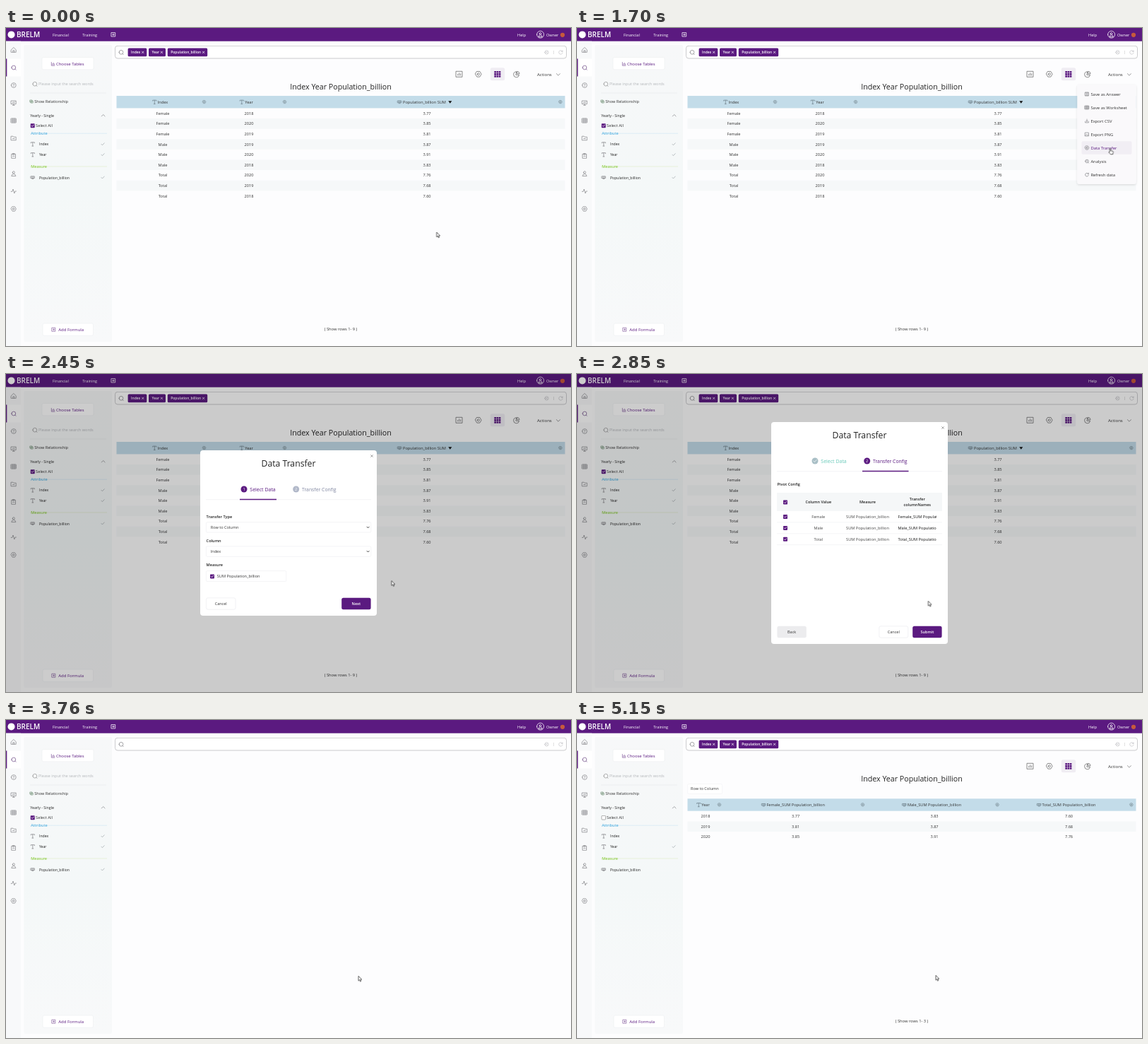
Animation, 800 px wide and 450 px high, one loop 5.3 s. Source, as an HTML page:

```html
<!DOCTYPE html>
<html lang="en">
<head>
<meta charset="utf-8">
<title>Data transfer</title>
<style>
html, body { margin: 0; width: 100%; height: 100%; overflow: hidden; background: #fdfdfe; }
svg { display: block; width: 800px; height: 450px; font: 5.65px "Open Sans", "Noto Sans", sans-serif; }
.line { fill: none; stroke: #8a8a8e; stroke-width: .75; stroke-linecap: round; stroke-linejoin: round; }
.b { font-weight: 600; }
.m { text-anchor: middle; }

/* hard switches */
.sw { animation: 5.3s step-end infinite; }
#tags { animation-name: tags; }
#tools { animation-name: tools; }
#wide, #checked { animation-name: wide; }
#pivot, #unchecked { animation-name: pivot; }
#actHover { animation-name: actHover; }
#shade { animation-name: shade; }
#pick { animation-name: pick; }
#config { animation-name: config; }
#rowHover { animation-name: rowHover; }
#chosen { animation-name: chosen; }
#arrow { animation-name: arrow; }
#hand { animation-name: hand; }
#nextHover { animation-name: nextHover; }
#submitHover { animation-name: submitHover; }
@keyframes tags { 0% { visibility: visible } 70.943% { visibility: hidden } 78.302%, 100% { visibility: visible } }
@keyframes tools { 0% { visibility: visible } 70.943% { visibility: hidden } 88.679%, 100% { visibility: visible } }
@keyframes wide { 0% { opacity: 1 } 70.943%, 100% { opacity: 0 } }
#checked { animation-name: checked; }
@keyframes checked { 0% { opacity: 1 } 88.679%, 100% { opacity: 0 } }
@keyframes pivot { 0% { opacity: 0 } 88.679%, 100% { opacity: 1 } }
@keyframes actHover { 0% { opacity: 0 } 9.434% { opacity: 1 } 23.6%, 100% { opacity: 0 } }
@keyframes shade { 0% { opacity: 0 } 33.774% { opacity: .2 } 70.943%, 100% { opacity: 0 } }
@keyframes pick { 0% { visibility: hidden } 33.774% { visibility: visible } 53.774%, 100% { visibility: hidden } }
@keyframes config { 0% { visibility: hidden } 53.774% { visibility: visible } 70.943%, 100% { visibility: hidden } }
@keyframes rowHover {
  0% { opacity: 0; transform: translateY(0) }
  24.13% { opacity: 1; transform: translateY(0) }
  25.26% { opacity: 1; transform: translateY(19px) }
  26.2% { opacity: 1; transform: translateY(38px) }
  27.17% { opacity: 1; transform: translateY(57px) }
  28.38%, 100% { opacity: 1; transform: translateY(76px) }
}
@keyframes chosen { 0% { fill: #333 } 28.38%, 100% { fill: #5b1a80 } }
@keyframes arrow {
  0% { opacity: 1 } 9.434% { opacity: 0 } 33.774% { opacity: 1 } 47.5% { opacity: 0 }
  53.774% { opacity: 1 } 61% { opacity: 0 } 70.943%, 100% { opacity: 1 }
}
@keyframes hand {
  0% { opacity: 0 } 9.434% { opacity: 1 } 33.774% { opacity: 0 } 47.5% { opacity: 1 }
  53.774% { opacity: 0 } 61% { opacity: 1 } 70.943%, 100% { opacity: 0 }
}
@keyframes nextHover { 0% { opacity: 0 } 47.5%, 100% { opacity: .1 } }
@keyframes submitHover { 0% { opacity: 0 } 63.962%, 100% { opacity: .1 } }

/* moving parts */
#menu { transform-origin: 750px 80px; animation: menu 5.3s infinite; }
@keyframes menu {
  0%, 12.075% { opacity: 0; transform: scaleY(.3); animation-timing-function: cubic-bezier(.23, 1, .32, 1) }
  17.17%, 33.77% { opacity: 1; transform: none; animation-timing-function: step-end }
  33.774%, 100% { opacity: 0; transform: none }
}
#cursor { animation: cursor 5.3s ease-in-out infinite; }
@keyframes cursor {
  0%, 1.132% { transform: translate(609.7px, 289px) }
  10.377%, 21.698% { transform: translate(771px, 66.5px) }
  30.377% { transform: translate(754.3px, 170px) }
  33.774% { transform: translate(754.3px, 170px); animation-timing-function: ease-in }
  40.566% { transform: translate(648px, 232px); animation-timing-function: ease-out }
  52.075%, 53.774% { transform: translate(497.3px, 321.3px) }
  63.396%, 78.302% { transform: translate(499px, 362.3px) }
  86.981%, 100% { transform: translate(508px, 361.3px) }
}
</style>
</head>
<body>
<svg id="stage" viewBox="0 0 800 450"></svg>
<script>
const purple = '#5b1a80', ink = '#333';

const text = (x, y, s, size = 5.65, fill = ink, cls = '') =>
  `<text x="${x}" y="${y}" font-size="${size}" fill="${fill}" class="${cls}">${s}</text>`;
const mid = (x, y, s, size, fill, cls = '') => text(x, y, s, size, fill, 'm ' + cls);
const rect = (x, y, w, h, fill, r = 0, stroke = 'none') =>
  `<rect x="${x}" y="${y}" width="${w}" height="${h}" rx="${r}" fill="${fill}" stroke="${stroke}" stroke-width=".6"/>`;
const dot = (x, y, r, fill) => `<circle cx="${x}" cy="${y}" r="${r}" fill="${fill}"/>`;
const group = (id, body, cls = 'sw') => `<g id="${id}" class="${cls}">${body}</g>`;
const icon = (x, y, d, color = '#8a8a8e', k = 1) =>
  `<path class="line" style="stroke:${color};stroke-width:${.75 / k}" transform="translate(${x} ${y}) scale(${k})" d="${d}"/>`;
const hline = (x1, x2, y, color, w = .6) =>
  `<path d="M${x1} ${y}H${x2}" stroke="${color}" stroke-width="${w}"/>`;

const ring = r => `M${-r} 0A${r} ${r} 0 1 1 ${r} 0A${r} ${r} 0 1 1 ${-r} 0Z`;
const gear = 'M-1.7 -3.2H1.7L3.6 0L1.7 3.2H-1.7L-3.6 0Z' + ring(1.3);
const lens = ring(2.9) + 'M2 2.1L3.2 3.3';
const tick = 'M-2 0L-.6 1.5L2.2 -1.5';
const cross = 'M-1.4 -1.4L1.4 1.4M1.4 -1.4L-1.4 1.4';
const down = 'M-2.6 -1.2L0 1.4L2.6 -1.2';
const tee = 'M-2.6 -1.5V-2.5H2.6V-1.5M0 -2.5V2.7M-1 2.7H1';
const num = 'M-2.6 -1.6H2.6V1H-2.6ZM-1 -1.6V1M1 -1.6V1M-1 2H1';
const box = 'M-3 -3H3V3H-3Z';
const icons = {
  home: 'M-3.4 -.2L0 -3.5L3.4 -.2V3.3H-3.4ZM-1 3.3V.8H1V3.3',
  help: ring(3.4) + 'M-1 -1Q0 -2.4 1 -1Q1 -.2 0 .5M0 1.7V1.8',
  board: 'M-3.4 -3H3.4V1.5H-3.4ZM0 1.5V3.4M-1.5 3.4H1.5M-1.8 -.2L-.3 -1.3L.5 0L2 -1.6',
  grid: 'M-3.4 -3H3.4V3H-3.4ZM-3.4 -1H3.4M-3.4 1H3.4M-1.1 -3V3M1.2 -3V3',
  folder: 'M-3.4 -2.8H-.8L0 -1.8H3.4V2.8H-3.4ZM-1.2 .5H1.2',
  clip: 'M-2.7 -2.6H2.7V3.3H-2.7ZM-1.2 -3.4H1.2V-2H-1.2ZM-1.3 .3H1.3',
  user: 'M-1.5 -1.6A1.5 1.7 0 1 1 1.5 -1.6A1.5 1.7 0 1 1 -1.5 -1.6ZM-3 3.2Q-2.6 .5 0 .5Q2.6 .5 3 3.2Z',
  pulse: 'M-3.6 .4H-2L-.8 -3L1 3L2 0H3.6',
};

const check = (x, y, s = 6) => rect(x, y, s, s, purple, .8) + icon(x + s / 2, y + s / 2, tick, '#fff', .8);
const button = (x, y, w, label, fill = '#fff', color = ink, cls = '') =>
  rect(x, y, w, 16.4, fill, 2.5, fill === '#fff' ? '#e8e8ec' : 'none') + mid(x + w / 2, y + 10.2, label, 5.5, color, cls);

function header() {
  return rect(0, 0, 800, 18.7, purple) + dot(7.5, 9.4, 5, '#fff') +
    text(15, 13.1, 'BRELM', 10, '#fff', 'b') +
    text(66, 11.7, 'Financial', 5.6, '#fff') + text(108.3, 11.7, 'Training', 5.6, '#fff') +
    icon(152, 9.3, 'M-2.7 -2.7H2.7V2.7H-2.7ZM-1.2 0H1.2M0 -1.2V1.2', '#fff') +
    text(724, 11.7, 'Help', 5.6, '#fff') +
    icon(756.6, 9.2, ring(5), '#fff') + icon(756.6, 9.4, icons.user, '#fff', .85) +
    text(765, 11.7, 'Owner', 5.5, '#fff') + dot(788, 9.8, 3.1, '#c65a3c');
}

function rail() {
  const list = [icons.home, lens, icons.help, icons.board, icons.grid, icons.folder, icons.clip, icons.user, icons.pulse, gear];
  return rect(0, 18.7, 21, 431.3, '#f8f9fa') + rect(0, 43.5, 21, 25, '#fff') + rect(0, 43.5, 1.3, 25, purple) +
    list.map((d, i) => icon(10.8, 31 + i * 25, d, i === 1 ? '#7b5b91' : '#8a8a8e')).join('');
}

function sidebar() {
  const field = (y, name, d) => icon(37.8, y, d) + text(47, y + 2, name, 5.15, '#222');
  const marks = ys => ys.map(y => icon(137, y, tick, '#a5acb0')).join('');
  return rect(25.3, 24, 124.7, 420, 'url(#panel)', 2) +
    rect(51, 41.5, 73, 17.3, '#fff', 2, '#eceef0') + icon(66.5, 51, 'M-2.2 -2.5V2.2H2.4M-.6 1V-.5M.8 1V-1.6M2.2 1V0', '#8f6aa6') +
    text(71, 52.5, 'Choose Tables', 5.92, purple) +
    icon(40.8, 79.2, lens, '#999') + text(46, 81.3, 'Please input the search words', 5.57, '#b4b7ba') +
    hline(34, 142, 92, '#e4e8ea') +
    icon(36.2, 104, 'M-2 -2H.8V.8H-2ZM-.8 -.8H2V2H-.8Z', '#7d9a80') + text(40.2, 106.2, 'Show Relationship', 5.6) +
    text(34.3, 125.5, 'Yearly - Single', 5.25, '#222') + icon(137.7, 123.7, 'M-2.4 1.2L0 -1.2L2.4 1.2') +
    text(42, 140.4, 'Select All', 5.75) +
    hline(34, 143, 149.2, '#cbe6f3') + text(35.3, 150.8, 'Attribute', 5.65, '#35a5dd') +
    field(164.3, 'Index', tee) + field(179.2, 'Year', tee) + marks([179.2]) +
    hline(34, 143, 196, '#dcebc6') + text(35.3, 198, 'Measure', 5.6, '#78c41c') +
    field(211.5, 'Population_billion', num) +
    group('checked', check(34.7, 135.2) + marks([164.3, 211.5])) +
    group('unchecked', rect(34.9, 135.4, 5.6, 5.6, '#fff', .8, '#777')) +
    rect(52, 418, 71.5, 17.3, '#fff', 2, '#eceef0') +
    icon(67.5, 426.7, 'M-2.3 -2.5H2.3V2.5H-2.3ZM-1 0H1M0 -1V1', '#8f6aa6') + text(74.2, 429, 'Add Formula', 6, purple);
}

function search() {
  const tag = (x, w, s) => rect(x, 28.4, w, 11.8, purple, 1.5) + text(x + 4.5, 36.4, s, 4.95, '#fff', 'b') +
    icon(x + w - 5.6, 34.4, cross, '#fff', .85);
  return rect(154.5, 25.3, 639, 17.7, '#fff', 3.5, '#a9a9ad') + icon(163, 34.3, lens) +
    icon(765.5, 34.4, ring(2.6) + 'M-1 -1L1 1M1 -1L-1 1', '#c4c4c8') + hline(775.2, 775.8, 34.4, '#ccc', 5) +
    icon(785.5, 34.4, 'M2.4 -1.2A2.7 2.7 0 1 0 2.6 .8M2.6 -2.5V-1H1', '#c4c4c8') +
    group('tags', tag(172.6, 26.7, 'Index') + tag(202, 24, 'Year') + tag(228.8, 56.4, 'Population_billion'));
}

function tools() {
  let cells = '';
  for (let i = 0; i < 9; i++) cells += rect(691.3 + i % 3 * 3.2, 61 + Math.floor(i / 3) * 3.1, 2.7, 2.6, purple, .3);
  return group('tools',
    icon(641.7, 65.3, 'M-4.3 -4H4.3V4H-4.3ZM-2 1.7V0M0 1.7V-1.5M2 1.7V-.5', '#666') +
    icon(668.8, 65.3, gear, '#666', 1.2) + rect(685.8, 56.3, 20.4, 18, '#f0edf3', 2.5) + cells +
    icon(722.8, 65.6, 'M-.5 -3.8A4 4 0 1 0 3.8 .8H-.5ZM1.2 -4.2A3.4 3.4 0 0 1 4.3 -1L1.2 -.8Z', '#666') +
    text(752, 67.7, 'Actions', 6.1) +
    group('actHover', rect(744, 56.3, 47.5, 18, '#ebe8ee', 2.5) + text(752, 67.7, 'Actions', 6.1, purple)) +
    icon(782, 65.8, down, '#777') + mid(474, 87, 'Index Year Population_billion', 10.65, '#222'));
}

// cols: [centre, label, type icon, icon x, gear x]
function table(top, cols, rows) {
  const head = rect(156.5, top, 635, 17.4, '#c3dce9') + cols.map(([x, s, d, ix, gx]) =>
    mid(x, top + 10.6, s) + icon(ix, top + 8.7, d, '#72858f') + icon(gx, top + 8.6, gear, '#80939d', .65)).join('');
  return head + rows.map((row, i) => {
    const y = top + 17.4 + i * 14.62;
    return (i % 2 ? rect(156.5, y, 635, 14.6, '#f6f8f9') : '') +
      row.map((s, c) => mid(cols[c][0], y + 9.3, s)).join('');
  }).join('') + mid(474, 427.5, `( Show rows 1- ${rows.length} )`, 5.75);
}

function wide() {
  const rows = 'Female 2018 3.77,Female 2020 3.85,Female 2019 3.81,Male 2019 3.87,Male 2020 3.91,Male 2018 3.83,Total 2020 7.76,Total 2019 7.68,Total 2018 7.60'
    .split(',').map(r => r.split(' '));
  return group('wide', table(96, [
    [222, 'Index', tee, 210.3, 280.6], [344, 'Year', tee, 333.8, 394.6],
    [592.5, 'Population_billion SUM', num, 557.2, 785]], rows.map(([a, b, c]) => [a, b, `<tspan dx="3.5">${c}</tspan>`])) +
    `<path d="M626.3 103.2H631.3L628.8 106.7Z" fill="#111"/>`);
}

function pivot() {
  const label = s => s + '_SUM Population_billion';
  return group('pivot', rect(156.6, 90.5, 49, 14, '#fff', 2, '#f0f0f3') + text(161, 99.4, 'Row to Column', 5.6) +
    table(111.3, [[182, 'Year', tee, 172.3, 201.6], [309.7, label('Female'), num, 264.3, 404.6],
      [506, label('Male'), num, 463.5, 595.2], [696.5, label('Total'), num, 654.3, 785]],
      [['2018', '3.77', '3.83', '7.60'], ['2019', '3.81', '3.87', '7.68'], ['2020', '3.85', '3.91', '7.76']]));
}

function menu() {
  const list = [['Save as Answer', box + 'M-1.5 -3V-1H1.5V-3M-1.5 3V1H1.5V3'], ['Save as Worksheet', icons.grid],
    ['Export CSV', 'M-3 1V3H3V1M0 -3V1M-1.5 -.5L0 1L1.5 -.5'], ['Export PNG', box + 'M-3 2L-1 0L.5 1.5L1.6 .5L3 2'],
    ['Data Transfer', gear], ['Analysis', lens + 'M-1 0L0 -1L1 .5'], ['Refresh data', 'M2.6 -1.4A3 3 0 1 0 3 .7M2.9 -3V-1.2H1.2']];
  return group('menu', `<g filter="url(#soft)">${rect(708.3, 80.3, 83.4, 140.7, '#faf9fb', 3)}</g>` +
    group('rowHover', rect(714.5, 84.2, 71, 18.6, '#f1eef4', 2)) +
    list.map(([s, d], i) => {
      const y = 93.5 + i * 19, t = text(727.4, y + 2.2, s, 5.9, i === 4 ? '' : ink);
      return icon(722, y, d, '#8a8a8e', .8) + (i === 4 ? group('chosen', t.replace('fill=""', '')) : t);
    }).join(''), '');
}

function dialog(top, h, step) {
  const y = top + 55, first = step === 1;
  return rect(275, top, 250, h, '#fff', 4) + icon(518, top + 8, cross, '#888') +
    mid(400, top + 23, 'Data Transfer', 12.2, '#222') +
    dot(337, y, 4.5, first ? purple : '#a9bfc6') +
    (first ? mid(337, y + 2, '1', 5.6, '#fff') : icon(337, y, tick, '#fff')) +
    text(345.3, y + 2.6, 'Select Data', 7, first ? purple : '#68c9b9') +
    dot(410.7, y, 4.5, first ? '#b1b8c9' : purple) + mid(410.7, y + 2, '2', 5.6, '#fff') +
    text(419, y + 2.6, 'Transfer Config', 6.85, first ? '#7f86a0' : purple) +
    hline(283, 517, top + 69.7, '#ececf0') +
    (first ? hline(331, 383, top + 69.5, purple, 1.4) : hline(404, 469.5, top + 69.5, purple, 1.4));
}

function pick() {
  const select = (y, label, value) => text(283.6, y, label, 5.6, '#222', 'b') +
    rect(283.4, y + 6, 233.4, 14.4, '#fff', 1.5, '#ececf0') + text(289.7, y + 15.3, value, 5.6) +
    icon(512.6, y + 13.3, 'M-1.5 -.8L0 .8L1.5 -.8', '#111', 1);
  return group('pick', dialog(108, 234, 1) + select(203.7, 'Transfer Type', 'Row to Column') +
    select(237.9, 'Column', 'Index') + text(283.6, 272.1, 'Measure', 5.6, '#222', 'b') +
    rect(283.4, 278.6, 113.4, 15, '#fff', 1.5, '#ececf0') + check(289, 283.4) +
    text(298.7, 288.3, 'SUM Population_billion') + button(283.4, 316.8, 41.6, 'Cancel') +
    button(475.2, 316.8, 41.4, 'Next', purple, '#fff', 'b') +
    group('nextHover', rect(475.2, 316.8, 41.4, 16.4, '#fff', 2.5)));
}

function config() {
  const rows = ['Female', 'Male', 'Total'].map((s, i) => {
    const y = 202 + i * 15.9;
    return check(292, y - 3) + mid(341.8, y + 2, s, 5.6, '#444') + mid(411.5, y + 2, 'SUM Population_billion', 5.65, '#444') +
      text(454.5, y + 2.1, s + '_SUM Population_billion', 5.65, '#111').replace('<text', '<text clip-path="url(#cell)"') +
      hline(283, 517, y + 7.9, '#eceef0');
  }).join('');
  const th = (x, y, s) => mid(x, y, s, 5.5, '#222', 'b');
  return group('config', dialog(68, 314, 2) + text(283.6, 157.9, 'Pivot Config', 5.6, '#222', 'b') +
    rect(283, 168, 234, 26, '#f5f7f8') + check(292, 178.6) + th(341.8, 183.3, 'Column Value') + th(411.5, 183.3, 'Measure') +
    th(481.8, 179.2, 'Transfer') + th(481.8, 187.3, 'columnNames') + rows +
    button(283.4, 356.8, 41.4, 'Back', '#ececee') + button(427.8, 356.8, 41, 'Cancel') +
    button(475.2, 356.8, 41.4, 'Submit', purple, '#fff', 'b') +
    group('submitHover', rect(475.2, 356.8, 41.4, 16.4, '#fff', 2.5)));
}

function cursor() {
  const shape = (id, d) => group(id, `<path d="${d}" fill="#fff" stroke="#222" stroke-width=".7" stroke-linejoin="round"/>`);
  return group('cursor', shape('arrow', 'M0 0V6.8L1.6 5.4L2.6 7.8L3.7 7.3L2.7 5H4.8Z') +
    shape('hand', 'M0 .8Q.6 -.3 1.2 .8V3.6L4.4 4.3Q5.2 4.6 5 5.6L4.4 8.8H1.2L-1.4 5.9Q-1.2 4.9 0 5.6Z'), '');
}

document.getElementById('stage').innerHTML = `<defs>
  <linearGradient id="panel" x2="0" y2="1"><stop stop-color="#f7f8f9"/><stop offset=".5" stop-color="#f4f8f8"/><stop offset="1" stop-color="#f8f9fa"/></linearGradient>
  <filter id="soft"><feDropShadow dx="0" dy="1" stdDeviation="1.5" flood-opacity=".13"/></filter>
  <clipPath id="cell"><rect x="454" y="190" width="55" height="60"/></clipPath>
</defs>` + rect(0, 0, 800, 450, '#fdfdfe') + header() + rail() + sidebar() + search() + wide() + pivot() + tools() + menu() +
  group('shade', '<rect width="800" height="450"/>') + pick() + config() + cursor();
</script>
</body>
</html>
```
